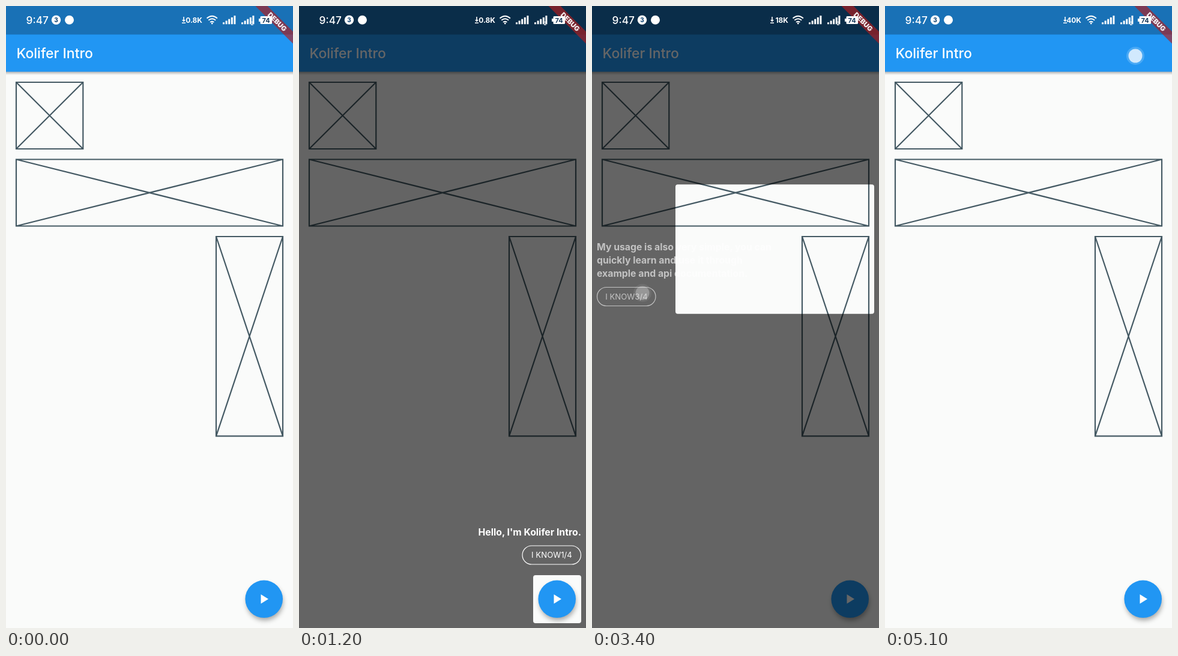
Recreate the animation shown at these times as an HTML page. Size 478 by 1036 pixels, loop 5.2 s.

```html
<!DOCTYPE html>
<html lang="en">
<head>
<meta charset="utf-8">
<title>Step guide</title>
<style>
  html, body { margin: 0; width: 100%; height: 100%; overflow: hidden; background: #fafbfa; }
  svg { display: block; width: 100%; height: 100%; }
  text { font-family: Inter, Roboto, sans-serif; fill: #fff; }
  .tip { font-size: 15.8px; font-weight: 700; }
  .label { font-size: 13.2px; }
  .pill { fill: none; stroke: #fff; stroke-width: 1.2; }
  .box { fill: none; stroke: #455a64; stroke-width: 2.2; }
</style>
</head>
<body>
<svg id="stage" viewBox="0 0 478 1036" preserveAspectRatio="none">
  <defs>
    <linearGradient id="barShadow" x2="0" y2="1">
      <stop stop-color="#000" stop-opacity=".3"/>
      <stop offset="1" stop-color="#000" stop-opacity="0"/>
    </linearGradient>
    <filter id="soft" x="-50%" y="-50%" width="200%" height="200%">
      <feGaussianBlur stdDeviation="4"/>
    </filter>
  </defs>

  <rect width="478" height="1036" fill="#fafbfa"/>
  <g id="boxes"></g>
  <rect y="109" width="478" height="6" fill="url(#barShadow)"/>
  <rect width="478" height="109.500" fill="#2196f3"/>
  <rect width="478" height="47.500" fill="#1971b6"/>
  <text x="17.500" y="87" font-size="23" font-weight="500">Kolifer Intro</text>

  <circle cx="431" cy="993" r="30" opacity=".36" filter="url(#soft)"/>
  <circle cx="429.700" cy="987.800" r="31.300" fill="#2196f3"/>
  <path d="M424.500 980v15.600l12.500-7.800z" fill="#fff"/>

  <g id="overlay">
    <path id="scrim" fill-opacity=".6" fill-rule="evenodd"/>
    <g id="tips"></g>
  </g>

  <g transform="translate(478 0) rotate(45)">
    <rect x="-45" y="30" width="90" height="14.300" fill="#b71c1c" fill-opacity=".63"/>
    <text y="41.200" font-size="11.300" font-weight="900" text-anchor="middle" fill-opacity=".9">DEBUG</text>
  </g>

  <g id="status" fill="#fff">
    <text x="33.500" y="30" font-size="17.300" font-weight="500">9:47</text>
    <circle cx="83.500" cy="23.300" r="7.700"/>
    <text x="83.500" y="27" font-size="10" font-weight="800" text-anchor="middle" style="fill:#174a78">3</text>
    <circle cx="105.500" cy="23.300" r="7.500"/>
    <path id="arrow" d="M-.8 18h1.600v5h2.200l-3 3.600-3-3.600h2.200zM-3 27.500h6v1.500h-6z"/>
    <text id="speed" x="327" y="28" font-size="12" font-weight="700" text-anchor="end"></text>
    <g fill="none" stroke="#fff" stroke-width="1.800">
      <path d="M334.500 20.500q8.700-7.600 17.400 0M337.300 23.800q5.900-5 11.800 0M340 27q3.200-2.600 6.400 0"/>
    </g>
    <circle cx="343.200" cy="29" r="1.400"/>
    <g id="bars"></g>
    <text x="410" y="31.500" font-size="7" font-weight="700" text-anchor="middle">2</text>
    <path d="M425 17h16.500q1.500 0 1.500 1.500v10q0 1.500-1.500 1.500h-16.500q-1.500 0-1.500-1.500v-2.500h-2.500v-5h2.500v-2.500q0-1.500 1.500-1.500z"/>
    <text x="433" y="27.600" font-size="11" font-weight="700" text-anchor="middle" style="fill:#173a5c">74</text>
  </g>

  <g id="touch" fill="#fff">
    <circle r="15" fill-opacity=".18"/>
    <circle r="11.500" fill-opacity=".75"/>
  </g>
</svg>
<script>
const LOOP = 5200, STEP = 100, FADE = 300;
const SHOW = 575, MOVES = [1374, 2290, 3282], HIDE = 4165;

const byId = id => document.getElementById(id);
const clamp = v => Math.max(0, Math.min(1, v));
const ramp = (t, start, length = FADE) => clamp((t - start) / length);

function add(parent, name, attrs, content = '') {
  const node = document.createElementNS('http://www.w3.org/2000/svg', name);
  for (const key in attrs) node.setAttribute(key, attrs[key]);
  node.textContent = content;
  return parent.appendChild(node);
}

// Placeholder boxes: left, top, right, bottom
for (const [l, t, r, b] of [[17, 127, 128.3, 238], [17, 255.5, 461, 366.5], [350, 384, 461, 716.3]]) {
  add(byId('boxes'), 'path', { class: 'box', d: `M${l} ${t}H${r}V${b}H${l}ZL${r} ${b}M${r} ${t}L${l} ${b}` });
}

for (const left of [361, 392]) {
  for (let i = 0; i < 5; i++) {
    const height = 3 + i * 2.8;
    add(byId('bars'), 'rect', { x: left + i * 4.6, y: 30.3 - height, width: 3, height });
  }
}

const steps = [
  { spot: [390, 948, 470, 1028], x: 470, y: 881.5, anchor: 'end', pill: [372, 899],
    lines: ["Hello, I'm Kolifer Intro."] },
  { spot: [8, 118, 137, 247], x: 8, y: 278, pill: [8.5, 340],
    lines: ['I can help you quickly implement the', 'Step By Step guide in the Kolifer', 'project.'] },
  { spot: [8, 247, 470, 375], x: 8, y: 406.5, pill: [8.5, 468.500],
    lines: ['My usage is also very simple, you can', 'quickly learn and use it through', 'example and api documentation.'] },
  { spot: [341, 375, 470, 725], x: 50.5, y: 389, pill: [225.5, 472.5],
    lines: ['In order to quickly implement the', 'guidance, I also provide a set of', 'out-of-the-box themes, I wish you', 'all a happy use, goodbye!'] }
];

steps.forEach((step, i) => {
  const group = step.node = add(byId('tips'), 'g', {});
  const [px, py] = step.pill;
  step.lines.forEach((line, n) => add(group, 'text',
    { class: 'tip', x: step.x, y: step.y + n * 22.2, 'text-anchor': step.anchor || 'start' }, line));
  add(group, 'rect', { class: 'pill', x: px, y: py, width: 97.5, height: 31, rx: 15.5 });
  add(group, 'text', { class: 'label', x: px + 49, y: py + 20.3, 'text-anchor': 'middle' }, `I KNOW${i + 1}/4`);
});

const taps = [
  { at: 520, x: 430, y: 990 },
  { at: MOVES[0], x: 420, y: 916 },
  { at: MOVES[1], x: 62, y: 356 },
  { at: MOVES[2], x: 84, y: 478 },
  { at: HIDE, x: 286, y: 493 },
  { at: 5190, x: 417, y: 83 }
];

function scrimPath([l, t, r, b], c = 4) {
  const arc = (x, y) => `a${c} ${c} 0 0 1 ${x} ${y}`;
  return `M0 0H478V1036H0ZM${l + c} ${t}H${r - c}${arc(c, c)}V${b - c}${arc(-c, c)}` +
    `H${l + c}${arc(-c, -c)}V${t + c}${arc(c, -c)}Z`;
}

function drawTouch(t) {
  const tap = taps.find(p => t >= p.at - 110 && t < p.at + 200);
  const node = byId('touch');
  node.setAttribute('opacity', tap ? 1 - ramp(t, tap.at, 200) : 0);
  if (tap) node.setAttribute('transform', `translate(${tap.x} ${tap.y})`);
}

function draw(t) {
  byId('overlay').setAttribute('opacity', ramp(t, SHOW) * (1 - ramp(t, HIDE)));

  let spot = steps[0].spot;
  MOVES.forEach((start, i) => {
    const p = ramp(t, start);
    spot = spot.map((v, k) => v + (steps[i + 1].spot[k] - v) * p);
  });
  byId('scrim').setAttribute('d', scrimPath(spot));

  // Each tip waits for the spotlight to arrive before it fades in
  steps.forEach((step, i) => {
    const enter = i ? ramp(t, MOVES[i - 1] + FADE + 10) : 1;
    const leave = i < 3 ? ramp(t, MOVES[i]) : 0;
    step.node.setAttribute('opacity', enter * (1 - leave));
  });

  byId('speed').textContent = t < 1250 ? '0.8K' : t < 3900 ? '18K' : '40K';
  byId('arrow').setAttribute('transform', `translate(${t < 1250 ? 296 : 300} 0)`);
  drawTouch(t);
}

function frame() {
  const t = performance.now() % LOOP;
  draw(Math.floor(t / STEP) * STEP);
  requestAnimationFrame(frame);
}
frame();
</script>
</body>
</html>
```
